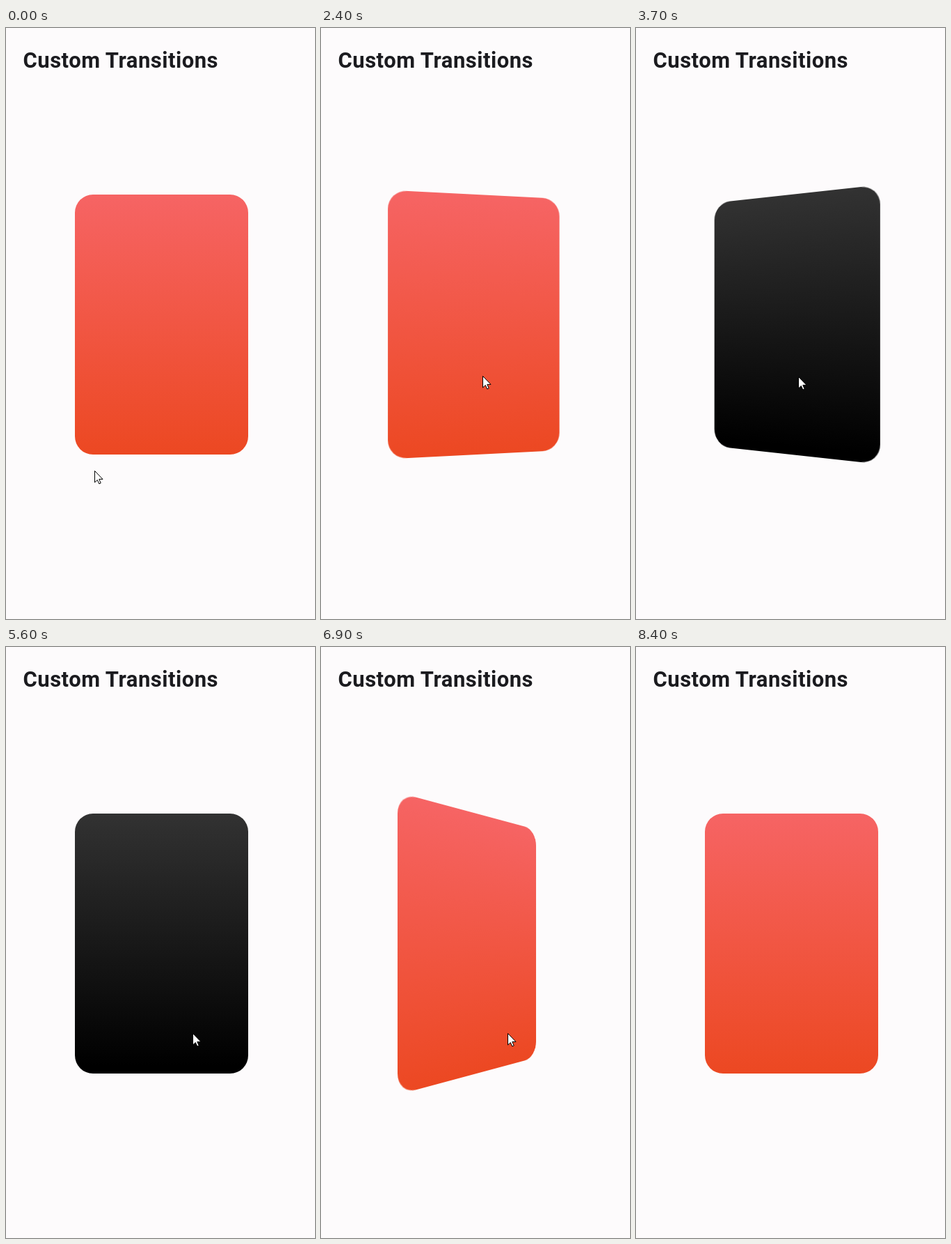
An HTML page that plays this animation: 444x848 px, repeating every 9.3 s.

```html
<!DOCTYPE html>
<html lang="en">
<head>
<meta charset="utf-8">
<title>Custom Transitions</title>
<style>
  html, body { margin: 0; width: 100%; height: 100%; overflow: hidden; background: #fdfbfc; }
  #card {
    position: absolute; left: 99px; top: 239px; width: 249px; height: 373px;
    border-radius: 26px;
  }
  .front { background: linear-gradient(#f66464, #ec4822); }
  .back { background: linear-gradient(#323232, #000 97%); }
  svg { position: absolute; left: 0; top: 0; }
  text { font: 700 31px Roboto, sans-serif; letter-spacing: .5px; fill: #1b1b1f; }
</style>
</head>
<body>
<div id="card" class="front"></div>
<svg width="444" height="848">
  <text x="24.5" y="57">Custom Transitions</text>
  <path id="cursor" d="M.5 .5V17L4.3 13.5 6.8 19 9.2 18 6.8 12.4H12Z"
    fill="#fff" stroke="#000" stroke-linejoin="round"/>
</svg>
<script>
const LOOP = 9300, STEP = 100, FLIP = 2580, EXIT = 8350;
const card = document.getElementById('card');
const cursor = document.getElementById('cursor');

const progress = (t, start, end) => Math.min(1, Math.max(0, (t - start) / (end - start)));
const smooth = s => s * s * (3 - 2 * s);

// cubic-bezier(.4, 0, .2, 1), its curve parameter found by bisection
function ease(u) {
  let low = 0, high = 1;
  while (high - low > 1e-7) {
    const s = (low + high) / 2, r = 1 - s;
    if (1.2 * r * r * s + .6 * r * s * s + s * s * s < u) low = s; else high = s;
  }
  return smooth(high);
}

const flip = (t, start) => {
  const u = progress(t, start, start + FLIP);
  return u > 0 && u < 1 ? ease(u) : u;
};

// The pointer rests between smooth glides
const glides = [
  { start: 0, end: 700, dx: 87, dy: -94 },
  { start: 1000, end: 1600, dx: 18, dy: -42 },
  { start: 3600, end: 4700, dx: 36, dy: 55 },
  { start: 7600, end: EXIT, dx: -182, dy: 241 }
];

function cursorAt(t) {
  let x = 127, y = 635;
  for (const { start, end, dx, dy } of glides) {
    const k = smooth(progress(t, start, end));
    x += dx * k;
    y += dy * k;
  }
  return [Math.round(x), Math.round(y)];
}

function draw(now) {
  const t = Math.floor(now % LOOP / STEP) * STEP;
  const angle = 180 * (flip(t, 2063) - flip(t, 5587));
  card.className = angle > 90 ? 'back' : 'front';
  card.style.transform = angle ? `perspective(550px) rotateY(${angle}deg)` : 'none';

  cursor.style.display = t < EXIT ? '' : 'none';
  cursor.setAttribute('transform', `translate(${cursorAt(t)})`);
}

let origin;
function tick(now) {
  origin ??= now;
  draw(now - origin);
  requestAnimationFrame(tick);
}
draw(0);
requestAnimationFrame(tick);
</script>
</body>
</html>
```
